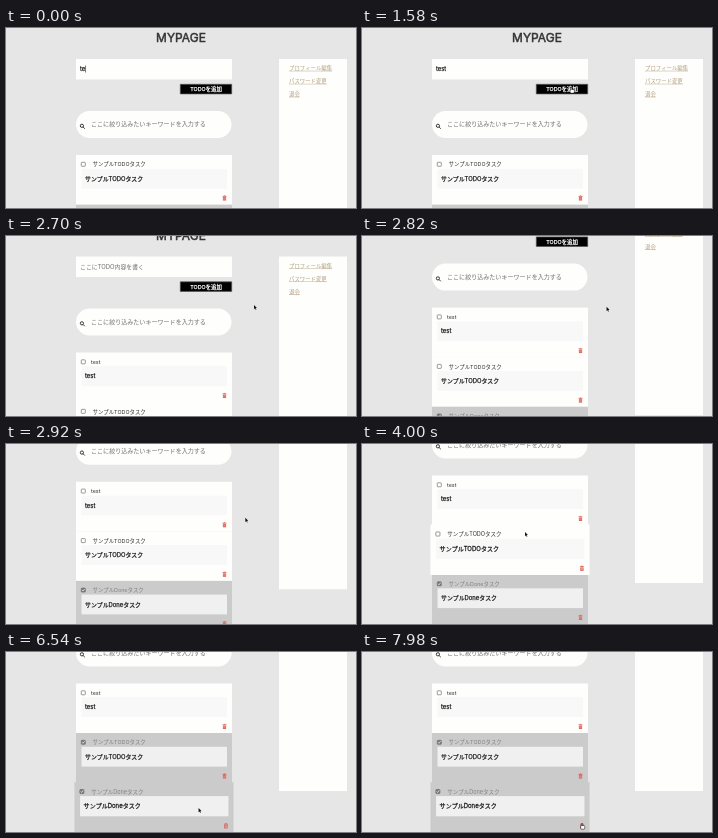
Write an HTML page with a canvas that moves like this. It is 350 px wide and 180 px high and loops after 8 s.

```html
<!DOCTYPE html>
<html lang="ja">
<head>
<meta charset="utf-8">
<title>MYPAGE</title>
<style>
html, body { margin: 0; width: 100%; height: 100%; overflow: hidden; background: #e6e6e6; }
canvas { display: block; width: 350px; height: 180px; }
</style>
</head>
<body>
<canvas id="stage"></canvas>
<script>
const LOOP = 8000, ADDED = 2080, TOGGLED = 5840;
const BACK = '#e6e6e6', PAPER = '#fefefc', INK = '#222', HINT = '#707070';
const FONT = 'Inter, "Noto Sans CJK JP", "Noto Sans CJK", sans-serif';
const canvas = document.getElementById('stage');
const ratio = window.devicePixelRatio || 1;
canvas.width = 350 * ratio;
canvas.height = 180 * ratio;
const ctx = canvas.getContext('2d');

const MOVES = [
  { from: 980, to: 1480, x: 209, y: 59.5 },
  { from: 2080, to: 2640, x: 248, y: 69 },
  { from: 2700, to: 3060, x: 235, y: 76 },
  { from: 3200, to: 3900, x: 163, y: 88 },
  { from: 4060, to: 4280, x: 75.5, y: 89 },
  { from: 6020, to: 6740, x: 219.5, y: 171.5 }
];

// Eased progress from 0 to 1 between two times
function ease(t, from, to) {
  const p = Math.min(1, Math.max(0, (t - from) / (to - from)));
  return p * p * (3 - 2 * p);
}

function rect(x, y, w, h, color) {
  ctx.fillStyle = color;
  ctx.fillRect(x, y, w, h);
}

function rounded(x, y, w, h, radius, fill, stroke) {
  ctx.beginPath();
  ctx.roundRect(x, y, w, h, radius);
  ctx.fillStyle = fill;
  ctx.fill();
  if (!stroke) return;
  ctx.strokeStyle = stroke;
  ctx.lineWidth = 0.7;
  ctx.stroke();
}

function line(points, color, width) {
  ctx.beginPath();
  points.forEach(([x, y]) => ctx.lineTo(x, y));
  ctx.strokeStyle = color;
  ctx.lineWidth = width;
  ctx.stroke();
}

// A thin outline gives the letters a medium weight
function text(str, x, y, size, color = INK, outline = 0, align = 'left') {
  ctx.font = `${size}px ${FONT}`;
  ctx.textAlign = align;
  ctx.fillStyle = ctx.strokeStyle = color;
  ctx.lineWidth = outline;
  ctx.fillText(str, x, y + size * 0.37);
  if (outline) ctx.strokeText(str, x, y + size * 0.37);
}

function checkbox(x, y, checked) {
  rounded(x - 2, y - 2, 4, 4, 0.6, checked ? '#777' : '#fff', '#707070');
  if (checked) line([[x - 1.2, y], [x - 0.3, y + 1], [x + 1.3, y - 1.1]], '#fff', 0.7);
}

function trash(x, y) {
  const red = '#d9574c';
  rect(x - 2, y - 2, 4, 0.7, red);
  rect(x - 0.8, y - 2.6, 1.6, 0.7, red);
  rect(x - 1.6, y - 0.9, 3.2, 3.4, red);
  for (const dx of [-0.8, 0.3]) rect(x + dx, y - 0.4, 0.5, 2.3, '#f6d3d0');
}

function card(title, y, done, hover) {
  const scale = 1 + 0.02 * hover;
  ctx.save();
  ctx.translate(148, y + 24.7);
  ctx.scale(scale, scale);
  ctx.translate(-148, -24.7);
  rect(70, 0, 156, 49.5, done ? '#cbcbcb' : PAPER);
  checkbox(77.3, 9.3, done);
  text(title, title === 'test' ? 85 : 86.5, 9.5, 5.4, done ? '#808080' : '#333');
  rect(75.5, 13.8, 145.5, 19.8, done ? '#f0f0f0' : '#f8f8f8');
  text(title, 79, 23.6, 5.9, INK, 0.25);
  trash(218.5, 43);
  ctx.restore();
}

function sidebar() {
  rect(273, 31, 68, 203.5, PAPER);
  ['プロフィール編集', 'パスワード変更', '退会'].forEach((label, i) => {
    const y = 40 + i * 13;
    text(label, 283, y, 5.4, '#b3a17e');
    rect(283, y + 2.8, label.length * 5.4, 0.5, '#bfb094');
  });
}

function form(t) {
  text('MYPAGE', 175, 9.6, 12, '#333', 0.45, 'center');
  rect(70, 31, 156, 20.5, PAPER);
  if (t < ADDED) {
    const typed = t < 560 ? 'te' : t < 840 ? 'tes' : 'test';
    text(typed, 74, 41.2, 5.8, INK, 0.25);
    if (t < 1000) rect(74.2 + ctx.measureText(typed).width, 37.5, 0.6, 7, INK);
  } else {
    text('ここにTODO内容を書く', 74, 41.2, 5.9, HINT);
  }
  rounded(174.3, 56.3, 51.4, 9.6, 0, '#000', '#555');
  text('TODOを追加', 200, 61.2, 5.4, '#fff', 0.25, 'center');
}

function search() {
  rounded(70, 83, 155.5, 27, 13.5, PAPER);
  ctx.beginPath();
  ctx.arc(75.9, 97.8, 1.6, 0, Math.PI * 2);
  ctx.moveTo(77.1, 99);
  ctx.lineTo(78.8, 100.7);
  ctx.strokeStyle = INK;
  ctx.lineWidth = 0.9;
  ctx.stroke();
  text('ここに絞り込みたいキーワードを入力する', 85, 96, 6.05, HINT);
}

function pointer(t) {
  if (t < MOVES[0].from) return;
  let x = 112, y = 45;
  for (const move of MOVES) {
    const p = ease(t, move.from, move.to);
    x += (move.x - x) * p;
    y += (move.y - y) * p;
  }
  const overButton = t > 1340 && t < 2180;
  const overCheckbox = t > 4250 && t < 6080;
  const overTrash = t > 6690;
  ctx.save();
  ctx.translate(x, y);
  if (overButton || overCheckbox || overTrash) {
    rounded(-0.8, 2, 4, 3.6, 1, '#fff', INK);
    rounded(-0.1, 0, 1.2, 3.6, 0.6, '#fff', INK);
    rect(-0.3, 2.5, 3, 2.4, '#fff');
  } else {
    ctx.fillStyle = '#111';
    ctx.fill(new Path2D('M0 0V4.2L1 3.3L2.9 3Z'));
    line([[1, 2.8], [1.9, 4.7]], '#111', 0.8);
  }
  ctx.restore();
}

function draw(t) {
  const scroll = 95.5 * ease(t, 2630, 2975);
  const top = t < ADDED ? 127 : 176.5;
  const hoverTodo = ease(t, 3420, 3570) - ease(t, TOGGLED, TOGGLED + 150);
  const hoverDone = ease(t, 6370, 6520);
  const todo = () => card('サンプルTODOタスク', top, t >= TOGGLED, hoverTodo);
  const done = () => card('サンプルDoneタスク', top + 49.5, true, hoverDone);

  ctx.setTransform(ratio, 0, 0, ratio, 0, 0);
  rect(0, 0, 350, 180, BACK);
  ctx.translate(0, -scroll);
  form(t);
  search();
  sidebar();
  if (t >= ADDED) card('test', 127, false, 0);
  // The hovered card lies on top
  for (const paint of hoverDone ? [todo, done] : [done, todo]) paint();
  ctx.translate(0, scroll);
  pointer(t);
}

function tick() {
  draw(performance.now() % LOOP);
  requestAnimationFrame(tick);
}
tick();
</script>
</body>
</html>
```
